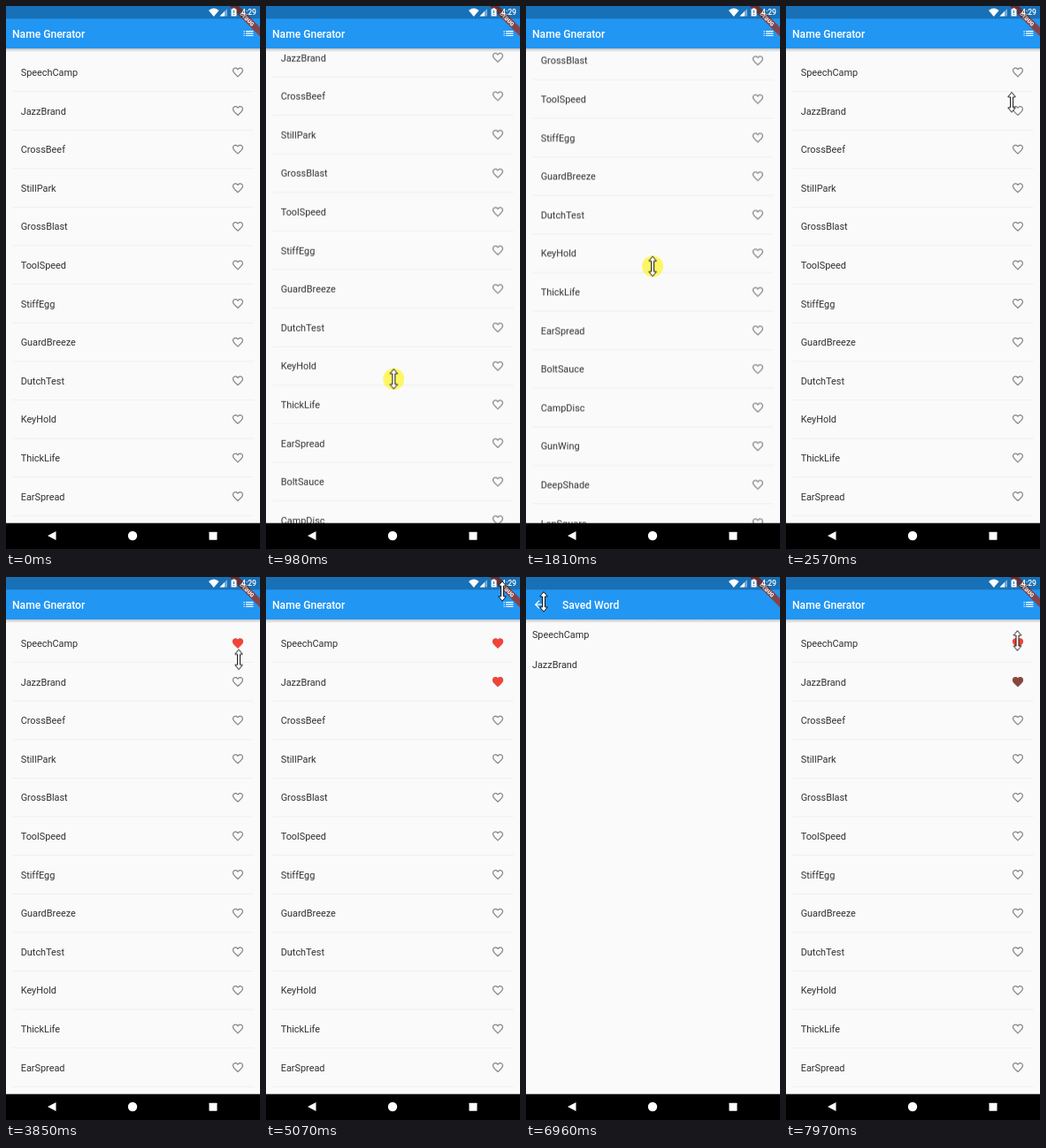
Write an HTML page that moves like this. It is 287x614 px and loops after 8 s.

```html
<!DOCTYPE html>
<html lang="en">
<head>
<meta charset="utf-8">
<title>Name list</title>
<style>
  html, body { margin: 0; width: 100%; height: 100%; overflow: hidden; background: #fafafa; }
  svg { display: block; width: 100%; height: 100%; }
  text { font: 10.9px Roboto, sans-serif; fill: #303030; }
  .title { font-size: 12.1px; font-weight: 500; fill: #fff; }
  .clock { font-size: 8.6px; font-weight: 500; fill: #fff; }
  .debug { font-size: 6.2px; font-weight: 900; fill: #fff; text-anchor: middle; }
  .bar { fill: #2196f3; }
  .paper { fill: #fafafa; }
  .white { fill: #fff; }
  .outline { fill: #858585; }
  .liked { fill: #f44336; opacity: 0; }
  #saved, #press, #cursor { opacity: 0; }
</style>
</head>
<body>
<svg viewBox="0 0 287 614">
  <defs>
    <linearGradient id="shade" x2="0" y2="1">
      <stop stop-opacity=".22"/>
      <stop offset="1" stop-opacity="0"/>
    </linearGradient>
    <path id="heart" d="M12 21.35l-1.45-1.32C5.4 15.36 2 12.28 2 8.5 2 5.42 4.42 3 7.5 3c1.74 0 3.41.81 4.5 2.09C13.09 3.81 14.76 3 16.5 3 19.58 3 22 5.42 22 8.5c0 3.78-3.4 6.86-8.55 11.54z"/>
    <path id="heart-line" d="M16.5 3c-1.74 0-3.41.81-4.5 2.09C10.91 3.81 9.24 3 7.5 3 4.42 3 2 5.42 2 8.5c0 3.78 3.4 6.86 8.55 11.54L12 21.35l1.45-1.32C18.6 15.36 22 12.28 22 8.5 22 5.42 19.58 3 16.5 3zm-4.4 15.55l-.1.1-.1-.1C7.14 14.24 4 11.39 4 8.5 4 6.5 5.5 5 7.5 5c1.54 0 3.04.99 3.57 2.36h1.87C13.46 5.99 14.96 5 16.5 5c2 0 3.5 1.5 3.5 3.5 0 2.89-3.14 5.74-7.9 10.05z"/>
    <path id="menu" d="M3 7h2v2H3zM3 11h2v2H3zM3 15h2v2H3zM7 7h14v2H7zM7 11h14v2H7zM7 15h14v2H7z"/>
    <path id="back" d="M20 11H7.83l5.59-5.59L12 4l-8 8 8 8 1.41-1.41L7.83 13H20z"/>
  </defs>

  <rect class="paper" width="287" height="614"/>
  <g id="list"></g>
  <rect class="bar" width="287" height="48"/>
  <rect y="48" width="287" height="4" fill="url(#shade)"/>
  <text class="title" x="7" y="35.8">Name Gnerator</text>
  <use class="white" href="#menu" transform="translate(266.7 23.8) scale(.606)"/>

  <g id="saved">
    <rect class="paper" width="287" height="585"/>
    <rect class="bar" width="287" height="48"/>
    <rect y="48" width="287" height="4" fill="url(#shade)"/>
    <use class="white" href="#back" transform="translate(7.4 23.9) scale(.606)"/>
    <text class="title" x="41" y="35.8">Saved Word</text>
  </g>

  <g transform="translate(287 0) rotate(45)">
    <rect x="-24" y="17" width="48" height="7.3" fill="#824449"/>
    <text class="debug" y="22.9">DEBUG</text>
  </g>
  <rect width="287" height="14.3" fill-opacity=".25"/>
  <g class="white">
    <path d="M229 5Q234.8 0 240.6 5L234.8 12Z"/>
    <path d="M250 3V11.5H241.5Z" opacity=".4"/>
    <path d="M247 6V11.5H241.5Z"/>
    <path d="M254.5 3.5H256V2.5H259V3.5H260.5V11.5H254.5Z"/>
    <path d="M257 5h1v3h-1zM257 9h1v1h-1z" fill="#1a70b5"/>
    <text class="clock" x="266" y="10.3">4:29</text>
  </g>

  <rect y="584.7" width="287" height="30"/>
  <g class="white">
    <path d="M47 599L56.5 594V604Z"/>
    <circle cx="143" cy="599" r="5.2"/>
    <rect x="229.5" y="594.7" width="9" height="9" rx=".6"/>
  </g>

  <g id="cursor">
    <circle id="press" r="12" fill="#fff400" fill-opacity=".6"/>
    <path d="M0-11.3L4.3-6H1.5V6H4.3L0 11.3-4.3 6H-1.5V-6H-4.3Z" fill="#fff" stroke="#000" stroke-width=".9"/>
  </g>
</svg>

<script>
const LOOP = 8000, PITCH = 43.6;
const WORDS = ['SpeechCamp', 'JazzBrand', 'CrossBeef', 'StillPark', 'GrossBlast', 'ToolSpeed',
  'StiffEgg', 'GuardBreeze', 'DutchTest', 'KeyHold', 'ThickLife', 'EarSpread', 'BoltSauce',
  'CampDisc', 'GunWing', 'DeepShade', 'LapSquare', 'DiscTheme', 'RockTrail', 'LampField'];
const $ = id => document.getElementById(id);

const heart = (kind, cls, id = '') =>
  `<use id="${id}" class="${cls}" href="#${kind}" transform="translate(254.7 67.7) scale(.606)"/>`;

$('list').innerHTML = WORDS.map((word, i) => `
  <g transform="translate(0 ${i * PITCH})">
    <text x="16.7" y="79">${word}</text>
    ${i < 2 ? heart('heart-line', 'outline') + heart('heart', 'liked', 'like' + i)
            : heart('heart-line', 'outline')}
    <rect x="7.5" y="96.3" width="272" height=".7" fill="#ebebeb"/>
  </g>`).join('');

$('saved').insertAdjacentHTML('beforeend', WORDS.slice(0, 2).map((word, i) =>
  `<text x="6.9" y="${69 + i * 34}">${word}</text>`).join(''));

// Each step is [time, properties, easing towards the next step].
function play(el, steps) {
  const first = steps[0], last = steps[steps.length - 1];
  const all = [[0, first[1]], ...steps, [LOOP, last[1]]];
  el.animate(all.map(([time, props, easing = 'linear']) => ({ offset: time / LOOP, easing, ...props })),
    { duration: LOOP, iterations: Infinity });
}
const at = (x, y) => ({ transform: `translate(${x}px, ${y}px)` });
const move = (el, steps) => play(el, steps.map(([t, x, y, easing]) => [t, at(x, y), easing]));
const show = (el, ...spans) => play(el, [[0, { opacity: 0 }, 'step-end'],
  ...spans.flatMap(([on, off]) => [[on, { opacity: 1 }, 'step-end'], [off, { opacity: 0 }, 'step-end']])]);

move($('list'), [[860, 0, 0], [1390, 0, -264], [1500, 0, -300], [1650, 0, -300], [2080, 0, 0]]);

move($('cursor'), [
  [370, 288, 8], [700, 215, 590, 'ease-in-out'], [860, 145, 482],
  [1390, 142, 218], [1500, 142, 182], [1650, 142, 182], [2080, 145, 482], [2150, 150, 500, 'ease-in-out'],
  [2570, 255, 109, 'ease-out'], [2850, 261.5, 78],
  [3770, 261.5, 78, 'ease-in-out'], [3950, 265, 115],
  [4840, 265, 115, 'ease-in-out'], [5070, 267, 16, 'ease-in-out'], [5350, 281, 28],
  [6370, 281, 28, 'ease-in'], [6600, 170, 18], [6780, 76, 15], [6880, 8, 24], [6960, 20, 28], [7110, 18, 28],
  [7560, 18, 28, 'ease-in-out'], [7960, 261.5, 72]
]);
show($('cursor'), [370, LOOP]);
show($('press'), [860, 1520], [1620, 2100], [3030, 3210], [4180, 4360], [5530, 5670], [7180, 7320]);

show($('like0'), [3350, LOOP]);
show($('like1'), [4510, LOOP]);
play($('like1'), [[0, { fill: '#f44336' }, 'step-end'], [7630, { fill: '#8b453f' }]]);

// The saved page rises a quarter of the screen while fading in, and leaves the same way.
move($('saved'), [
  [5675, 0, 146, 'cubic-bezier(.4,0,.2,1)'], [5975, 0, 0],
  [7330, 0, 0, 'cubic-bezier(.8,0,.6,1)'], [7630, 0, 146]
]);
play($('saved'), [
  [5675, { opacity: 0 }, 'cubic-bezier(.42,0,1,1)'], [5975, { opacity: 1 }],
  [7330, { opacity: 1 }, 'cubic-bezier(0,0,.58,1)'], [7630, { opacity: 0 }]
]);
</script>
</body>
</html>
```
